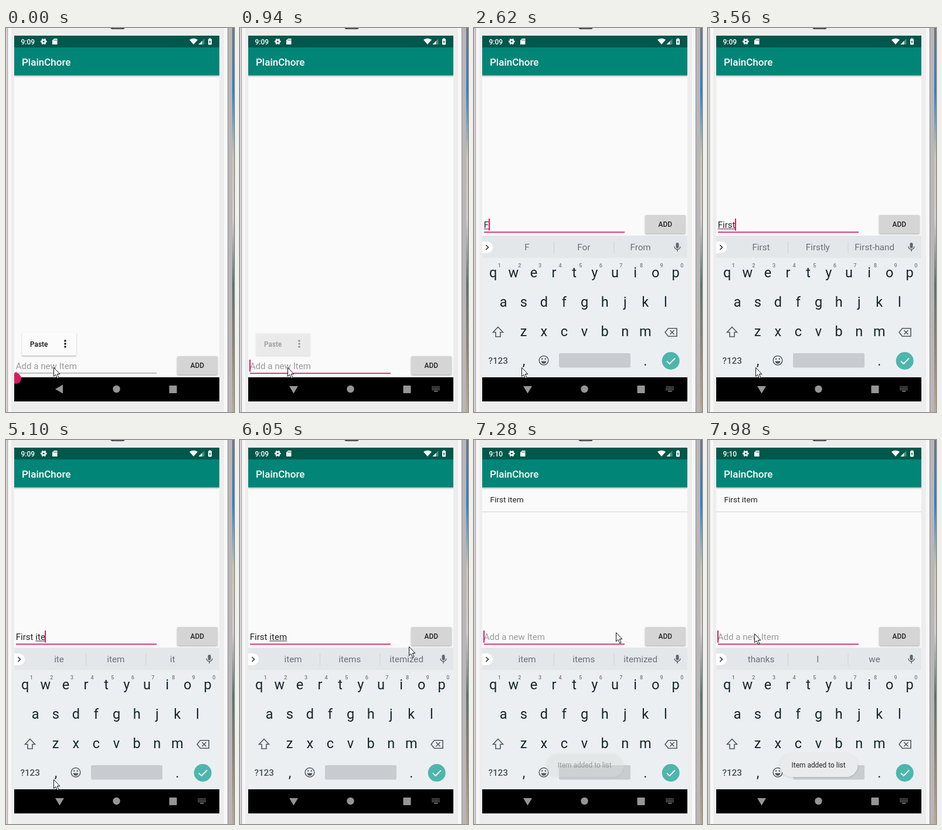
Write an HTML page with a canvas that moves like this. It is 389x653 px and loops after 8000 ms.

```html
<!DOCTYPE html>
<html lang="en">
<head>
<meta charset="utf-8">
<title>Todo app demo</title>
<style>
html, body { margin: 0; width: 100%; height: 100%; overflow: hidden; background: #eee; }
canvas { display: block; width: 389px; height: 653px; }
</style>
</head>
<body>
<canvas id="stage"></canvas>
<script>
const W = 389, H = 653, LOOP = 8000;
const PINK = '#d81b60', TEAL = '#008577', FONT = 'Roboto, sans-serif';
const ENTRY = 'First item';
const KEY_TIMES = [1480, 2750, 3000, 3300, 3440, 4120, 4680, 4830, 5100, 5350];
// Suggestions after each typed character, starting with none.
const HINTS = ['thanks I we', 'F For From', 'Fi Fire For', 'Fir First Fire', 'Firs First Firstly',
  'First Firstly First-hand', 'day time one', 'it I is', 'it I is', 'ite item it', 'item items itemized'];
const FOCUS = 550, LEAVE = 820, RISE = 1210, SETTLE = 1330, PRESS = 6780, SENT = 7040;
const BLINK = 465;

const canvas = document.getElementById('stage');
const ctx = canvas.getContext('2d');
const dpr = window.devicePixelRatio || 1;
canvas.width = W * dpr;
canvas.height = H * dpr;

const ramp = (t, from, to) => Math.min(1, Math.max(0, (t - from) / (to - from)));
const easeOut = p => 1 - (1 - p) ** 3;
const easeInOut = p => p * p * (3 - 2 * p);
const mix = (a, b, p) => a + (b - a) * p;

function rect(x, y, w, h, color) {
  ctx.fillStyle = color;
  ctx.fillRect(x, y, w, h);
}

function round(x, y, w, h, r, color) {
  ctx.fillStyle = color;
  ctx.beginPath();
  ctx.roundRect(x, y, w, h, r);
  ctx.fill();
}

function disc(x, y, r, color) {
  ctx.fillStyle = color;
  ctx.beginPath();
  ctx.arc(x, y, r, 0, Math.PI * 2);
  ctx.fill();
}

function arc(x, y, r, color, width, end = Math.PI * 2) {
  ctx.strokeStyle = color;
  ctx.lineWidth = width;
  ctx.beginPath();
  ctx.arc(x, y, r, 0, end);
  ctx.stroke();
}

function trace(points, close) {
  ctx.beginPath();
  for (let i = 0; i < points.length; i += 2) ctx.lineTo(points[i], points[i + 1]);
  if (close) ctx.closePath();
}

function poly(points, color) {
  trace(points, true);
  ctx.fillStyle = color;
  ctx.fill();
}

function line(points, color, width = 1, close = false) {
  trace(points, close);
  ctx.strokeStyle = color;
  ctx.lineWidth = width;
  ctx.stroke();
}

function text(str, x, y, size, color, weight = 400, align = 'left') {
  ctx.font = `${weight} ${size}px ${FONT}`;
  ctx.textAlign = align;
  ctx.fillStyle = color;
  ctx.fillText(str, x, y);
}

function shadowed(blur, dy, alpha, draw) {
  ctx.save();
  ctx.shadowColor = `rgba(0,0,0,${alpha})`;
  ctx.shadowBlur = blur * dpr;
  ctx.shadowOffsetY = dy * dpr;
  draw();
  ctx.restore();
}

function clipped(x, y, w, h, draw) {
  ctx.save();
  ctx.beginPath();
  ctx.rect(x, y, w, h);
  ctx.clip();
  draw();
  ctx.restore();
}

function drawDevice() {
  rect(0, 0, W, H, '#eeedee');
  rect(0, 0, 2, H, '#ddd6d8');
  rect(2, 0, 1.5, H, '#aaa6a9');
  rect(3.5, 0, 5.5, H, '#f8f7f8');
  rect(372, 0, 6, H, '#f9f8f9');
  rect(378, 0, 1.5, H, '#8b898c');
  rect(379.5, 0, 6.5, H, '#b9b5b8');
  const wall = ctx.createLinearGradient(0, 0, 0, H);
  ['#6c7480', '#2380cf', '#c9c7ae', '#d3cdce', '#56706a', '#8d8270', '#bda88d']
    .forEach((c, i, all) => wall.addColorStop(i / (all.length - 1), c));
  rect(386, 0, 3, H, wall);
  round(178, -6, 25, 8, 4, '#333');
  round(181, -6, 19, 6.5, 3, '#aaa');
}

function drawStatus(t) {
  const dark = '#00574b';
  rect(14, 13, 350, 20, dark);
  text(t < SENT + BLINK / 4 ? '9:09' : '9:10', 25.5, 27.5, 12, '#fff', 500);
  for (let i = 0; i < 6; i++) {
    const a = i * Math.PI / 3, c = Math.cos(a), s = Math.sin(a);
    line([64.3, 23, 64.3 + 5.3 * c, 23 + 5.3 * s], '#fff', 2.6);
  }
  disc(64.3, 23, 4, '#fff');
  disc(64.3, 23, 1.6, dark);
  poly([82, 18, 87.5, 18, 87.5, 28, 79, 28, 79, 21], '#fff');
  for (let i = 0; i < 3; i++) rect(81.5 + i * 2, 19.5, 1, 2, dark);
  ctx.beginPath();
  ctx.moveTo(320, 28);
  ctx.lineTo(313, 20);
  ctx.quadraticCurveTo(320, 15.5, 327, 20);
  ctx.fillStyle = '#fff';
  ctx.fill();
  poly([338.5, 18, 338.5, 28, 328.5, 28], '#4d8980');
  poly([334.5, 22, 334.5, 28, 328.5, 28], '#fff');
  round(345, 18.5, 6, 10, 1, '#fff');
  rect(346.5, 17.5, 3, 1.5, '#fff');
  poly([348.6, 20, 346.3, 24, 347.7, 24, 347.4, 27, 349.7, 23, 348.3, 23], dark);
}

function drawNav(t) {
  const gray = '#959595';
  rect(14, 594, 350, 41, '#000');
  disc(188.5, 614, 6.2, gray);
  round(278.5, 608, 13, 13, 1, gray);
  if (t < LEAVE) {
    poly([84, 614, 97, 606.5, 97, 621.5], gray);
    return;
  }
  poly([84, 609, 99, 609, 91.5, 621.5], gray);
  for (let i = 0; i < 18; i++)
    rect(327.5 + i % 6 * 2.3, 609.5 + Math.floor(i / 6) * 2.5, 1.4, 1.5, gray);
  rect(331, 617, 6.5, 1.4, gray);
}

function drawApp(t) {
  rect(14, 80, 350, 514, '#fafafa');
  if (t >= SENT) {
    text(ENTRY, 27.5, 106.3, 13.6, '#212121');
    rect(14, 121.5, 350, 1.3, '#dcdcdc');
  }
  clipped(14, 33, 350, 60, () => shadowed(2.5, 1, .3, () => rect(14, 33, 350, 47.5, TEAL)));
  text('PlainChore', 27, 63.5, 17, '#fff', 500);
}

function drawButton(t) {
  shadowed(2.5, 1.2, .3, () => round(292, 318, 69, 31.5, 2, '#d6d5d6'));
  if (t >= PRESS && t < SENT) clipped(292, 318, 69, 31.5, () => {
    rect(292, 318, 69, 31.5, 'rgba(0,0,0,.04)');
    disc(313, 333, 44 + (t - PRESS) * .13, 'rgba(0,0,0,.08)');
  });
  text('ADD', 326.3, 338.2, 11.9, '#222', 500, 'center');
}

function drawField(t, count) {
  const left = 16.7, str = t < SENT ? ENTRY.slice(0, count) : '';
  const width = s => ctx.measureText(s).width;
  ctx.save();
  if (t < RISE) ctx.translate(0, 240);
  text(str || 'Add a new Item', left, 340.3, 15.1, str ? '#222' : '#999');
  const wordStart = left + width(str.slice(0, str.lastIndexOf(' ') + 1));
  const end = left + width(str);
  rect(wordStart, 341.3, end - wordStart, 1, '#333');

  const focused = t >= FOCUS;
  rect(17, 346.4, 240, focused ? 1.7 : 1, focused ? PINK : '#858585');
  // The caret restarts its blink at every edit and rests while the keyboard opens.
  const lastEdit = [FOCUS, ...KEY_TIMES, SENT].filter(k => k <= t).pop();
  const lit = Math.floor((t - lastEdit) / BLINK) % 2 === 0;
  if (focused && lit) rect(Math.floor(end), 324, 2, 20.5, PINK);
  drawButton(t);
  ctx.restore();
}

function drawPopup(t) {
  ctx.save();
  ctx.globalAlpha = 1 - ramp(t, LEAVE - 80, 1060);
  if (ctx.globalAlpha > 0) {
    shadowed(2, 1.3, .3, () => round(27, 518, 93, 39, 1, '#fbfbfb'));
    text('Paste', 41, 541.5, 11.9, '#111', 500);
    for (let i = 0; i < 3; i++) disc(101, 532 + i * 5, 1.8, '#111');
  }
  ctx.restore();
  if (t < LEAVE) clipped(14, 580, 30, 30, () => {
    disc(17, 596, 9, PINK);
    poly([17, 585, 23.4, 589.6, 10.6, 589.6], PINK);
  });
}

function drawSuggestions(words) {
  const gray = '#5f686d';
  rect(14, 353, 350, 38, '#e4e7ea');
  round(14, 363, 18, 20, [0, 10, 10, 0], '#fff');
  line([20.3, 369, 24.5, 373, 20.3, 377], '#333', 1.6);
  words.split(' ').forEach((s, i) => text(s, 90.5 + i * 96.8, 378.4, 15.2, '#697176', 400, 'center'));
  rect(136, 363, 1, 20, '#cdd1d4');
  rect(238.5, 363, 1, 20, '#cdd1d4');
  round(344.5, 365, 5, 9.5, 2.5, gray);
  arc(347, 371.5, 5, gray, 1.4, Math.PI);
  rect(346.2, 376, 1.6, 4, gray);
}

function drawKeys() {
  const ink = '#15242b', gray = '#4f5a60', pitch = 34.6;
  const key = (k, x, row) => text(k, x, 424 + row * 50, 23.5, ink, 400, 'center');
  ['qwertyuiop', 'asdfghjkl', 'zxcvbnm'].forEach((keys, row) =>
    [...keys].forEach((k, i) => key(k, 32.8 + row * row * 0 + (row + (row > 1)) * pitch / 2 + i * pitch, row)));
  key(',', 85, 3);
  key('.', 292.3, 3);
  for (let i = 0; i < 10; i++) text((i + 1) % 10, 43.3 + i * pitch, 407, 9, '#717b80', 500, 'center');

  line([41, 508.5, 49.5, 517.5, 45, 517.5, 45, 525, 37, 525, 37, 517.5, 32.5, 517.5], gray, 1.6, true);
  line([331.5, 510.8, 346, 510.8, 346, 524.2, 331.5, 524.2, 326, 517.5], gray, 1.6, true);
  line([334.5, 514, 341.5, 521], gray, 1.6);
  line([341.5, 514, 334.5, 521], gray, 1.6);

  text('?123', 41.2, 571.2, 15.3, '#455056', 500, 'center');
  arc(119, 565.2, 7.8, gray, 1.5);
  for (const x of [116.2, 121.8]) disc(x, 562.8, 1.3, gray);
  ctx.beginPath();
  ctx.arc(119, 566.5, 4.4, 0, Math.PI);
  ctx.fill();
  round(145, 553, 122, 24.5, 2.5, '#c8ccd0');
  disc(335.7, 566, 15, '#4db6ac');
  line([329, 566.5, 333.7, 571, 343, 561.5], '#fff', 1.9);
}

function drawKeyboard(t, count) {
  if (t < RISE) return;
  const rising = t < SETTLE;
  ctx.save();
  if (rising) {
    rect(14, 594, 350, 5.5, '#c9cccd');
    ctx.translate(0, 5);
    ctx.globalAlpha = .9;
  }
  rect(14, 391, 350, rising ? 198 : 203, '#ebeff1');
  drawSuggestions(HINTS[t < SENT + 390 ? count : 0]);
  drawKeys();
  ctx.restore();
}

function drawToast(t) {
  if (t < SENT) return;
  ctx.save();
  ctx.globalAlpha = ramp(t, SENT, 7700);
  shadowed(3, 1, .13, () => round(122.5, 533, 133, 40, 20, '#e9ebec'));
  text('Item added to list', 188.6, 557.2, 11.9, '#252525', 400, 'center');
  ctx.restore();
}

function drawMouse(t) {
  const go = easeOut(ramp(t, 5760, 6300)), back = easeInOut(ramp(t, 7100, 7600));
  const arrow = [.5, .5, .5, 15.5, 3.8, 12.4, 6.6, 18.7, 9, 17.6, 6.3, 11.5, 10.8, 11.5];
  ctx.save();
  ctx.translate(Math.round(mix(mix(81, 311, go), 79, back)), Math.round(mix(mix(577, 326, go), 329, back)));
  poly(arrow, '#fff');
  line(arrow, '#111', 1, true);
  ctx.restore();
}

function draw(t) {
  const count = KEY_TIMES.filter(k => k <= t).length;
  ctx.setTransform(dpr, 0, 0, dpr, 0, 0);
  drawDevice();
  drawApp(t);
  drawStatus(t);
  drawField(t, count);
  drawNav(t);
  drawPopup(t);
  drawKeyboard(t, count);
  drawToast(t);
  drawMouse(t);
}

const begin = performance.now();
function frame() {
  draw((performance.now() - begin) % LOOP);
  requestAnimationFrame(frame);
}
frame();
</script>
</body>
</html>
```
